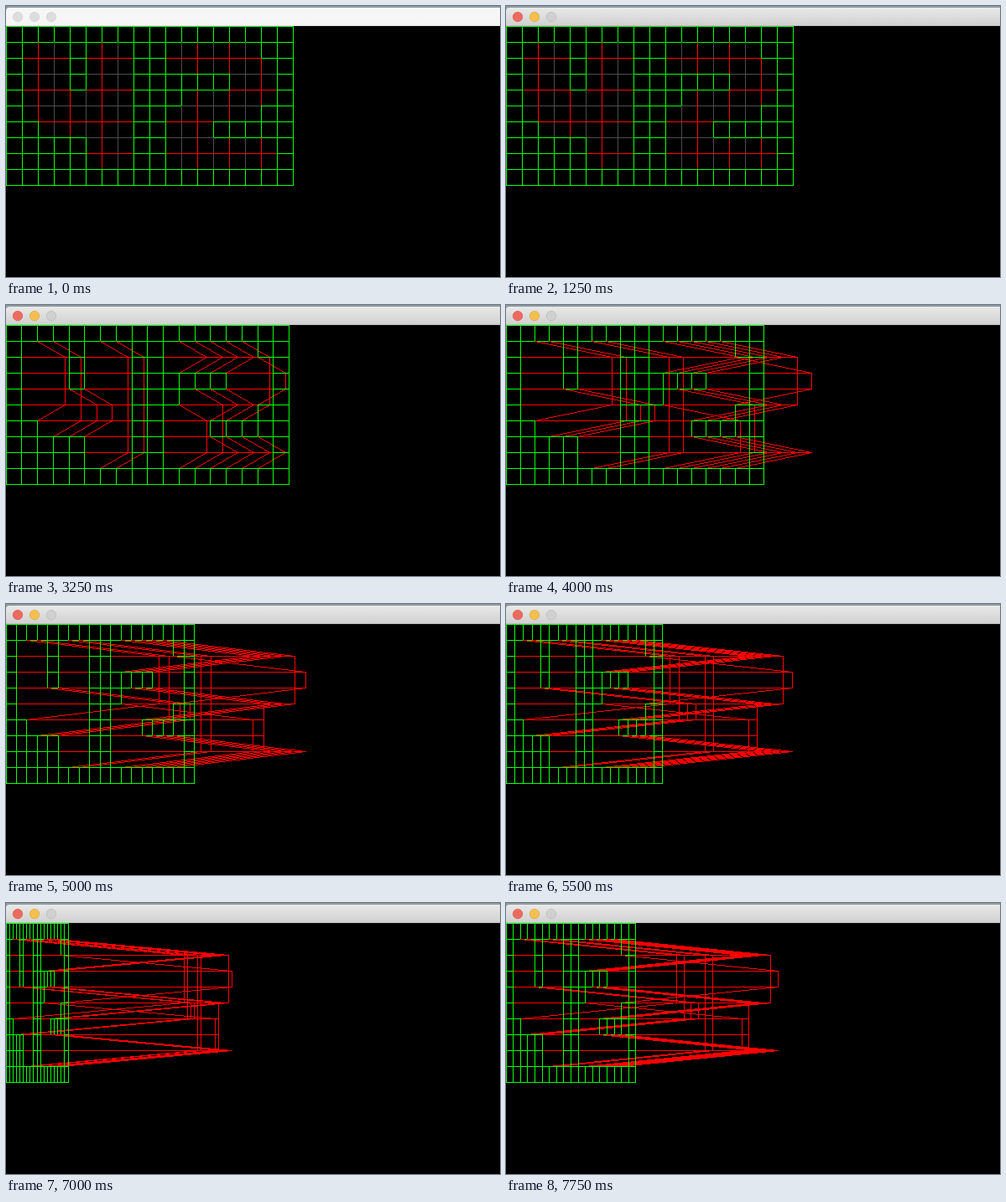
Animation, 589 px wide and 324 px high, one loop 8000 ms. Source, as an HTML page with a canvas:

```html
<!DOCTYPE html>
<html lang="en">
<head>
<meta charset="utf-8">
<title>Wireframe rotation</title>
<style>
html, body { margin: 0; width: 100%; height: 100%; overflow: hidden; background: #000; }
canvas { display: block; width: 589px; height: 324px; }
</style>
</head>
<body>
<canvas id="stage" width="589" height="324"></canvas>
<script>
const ctx = document.getElementById('stage').getContext('2d');
const LOOP = 8000, TICK = 250;
const STEP = 19, TOP = 24, HEIGHT = 209, COLS = 19, ROWS = 11;
const RED = '#ff0000', GREEN = '#00ff00', GRAY = '#4c4c4c';

// Raised cells of the height map
const relief = [
  '',
  '',
  '  ##  ##   #####',
  '  ##  ##       ##',
  '  ##  ##       ##',
  '  ######    ####',
  '   #####   ##',
  '      ##   ##',
  '      ##   ######',
  '',
  ''
];
const raised = (c, r) => relief[r][c] === '#';

// [time, value...] keys with linear motion between them
const angleKeys = [[2850, 0], [4000, 26.1], [5000, 48.9], [6250, 68.9], [6750, 78.5], [7000, 77.5], [7750, 63.05]];
const cursorKeys = [[1750, 398, 204], [2250, 443, 231], [2500, 443, 231], [3000, 512, 240]];

function at(keys, t) {
  if (t <= keys[0][0]) return keys[0].slice(1);
  for (let i = 1; i < keys.length; i++) {
    const a = keys[i - 1], b = keys[i];
    if (t <= b[0]) {
      const k = (t - a[0]) / (b[0] - a[0]);
      return a.slice(1).map((v, j) => v + (b[j + 1] - v) * k);
    }
  }
  return keys[keys.length - 1].slice(1);
}

// Aliased one-pixel line
function line(x0, y0, x1, y1, color) {
  ctx.fillStyle = color;
  if (x0 === x1 || y0 === y1) {
    ctx.fillRect(Math.min(x0, x1), Math.min(y0, y1), Math.abs(x1 - x0) + 1, Math.abs(y1 - y0) + 1);
    return;
  }
  const n = Math.max(Math.abs(x1 - x0), Math.abs(y1 - y0));
  for (let i = 0; i <= n; i++) {
    ctx.fillRect(Math.round(x0 + (x1 - x0) * i / n), Math.round(y0 + (y1 - y0) * i / n), 1, 1);
  }
}

function drawMesh(angle) {
  const a = angle * Math.PI / 180, cos = Math.cos(a), sin = Math.sin(a);
  const point = (c, r) => [
    Math.floor(c * STEP * cos + (raised(c, r) ? HEIGHT * sin : 0) + 1e-6),
    TOP + r * STEP
  ];
  const edge = (c, r, c2, r2) => {
    const odd = (c === c2 ? c : r) % 2;
    const red = raised(c, r) || raised(c2, r2);
    const color = !red ? GREEN : odd && angle === 0 ? GRAY : RED;
    line(...point(c, r), ...point(c2, r2), color);
  };
  for (let r = 0; r < ROWS; r++) {
    for (let c = 0; c < COLS; c++) {
      if (c + 1 < COLS) edge(c, r, c + 1, r);
      if (r + 1 < ROWS) edge(c, r, c, r + 1);
    }
  }
}

function drawButton(x, fill, stroke) {
  ctx.beginPath();
  ctx.arc(x, 13, 5.75, 0, Math.PI * 2);
  ctx.fillStyle = fill;
  ctx.fill();
  ctx.strokeStyle = stroke;
  ctx.lineWidth = 0.7;
  ctx.stroke();
}

function drawTitleBar(active) {
  ctx.fillStyle = '#8d9b9d';
  ctx.fillRect(0, 0, 589, 8);
  const shade = ctx.createLinearGradient(0, 2, 0, 23);
  shade.addColorStop(0, active ? '#e9e9e9' : '#f7f7f7');
  shade.addColorStop(1, active ? '#d1d1d1' : '#f5f5f5');
  ctx.fillStyle = shade;
  ctx.beginPath();
  ctx.moveTo(0, 24);
  ctx.lineTo(0, 6);
  ctx.quadraticCurveTo(0, 2, 4, 2);
  ctx.lineTo(589, 2);
  ctx.lineTo(589, 24);
  ctx.fill();
  ctx.fillStyle = active ? '#b8b8b8' : '#dedede';
  ctx.fillRect(0, 23, 589, 1);
  drawButton(14, active ? '#ed6a5f' : '#dddddd', active ? '#d9564c' : '#d2d2d2');
  drawButton(34, active ? '#f5bf4f' : '#dddddd', active ? '#dca63b' : '#d2d2d2');
  drawButton(54, active ? '#d0d0d0' : '#dddddd', active ? '#bababa' : '#d2d2d2');
}

const arrow = new Path2D('M.5 .5V15.5L4 12.2L6.3 17.3L8.8 16.2L6.5 11.2H11Z');

function drawCursor(x, y) {
  ctx.save();
  ctx.translate(Math.round(x), Math.round(y));
  ctx.fillStyle = '#000';
  ctx.fill(arrow);
  ctx.strokeStyle = '#fff';
  ctx.lineWidth = 1.1;
  ctx.stroke(arrow);
  ctx.restore();
}

function draw(t) {
  ctx.fillStyle = '#000';
  ctx.fillRect(0, 0, 589, 324);
  drawTitleBar(t >= 1250);
  drawMesh(at(angleKeys, t)[0]);
  if (t >= 1750 && t < 3250) drawCursor(...at(cursorKeys, t));
}

let shown = -1;
const start = performance.now();

function frame() {
  const now = Math.max(0, performance.now() - start) % LOOP;
  const t = Math.floor(now / TICK) * TICK;
  if (t !== shown) draw(shown = t);
  requestAnimationFrame(frame);
}
frame();
</script>
</body>
</html>
```
